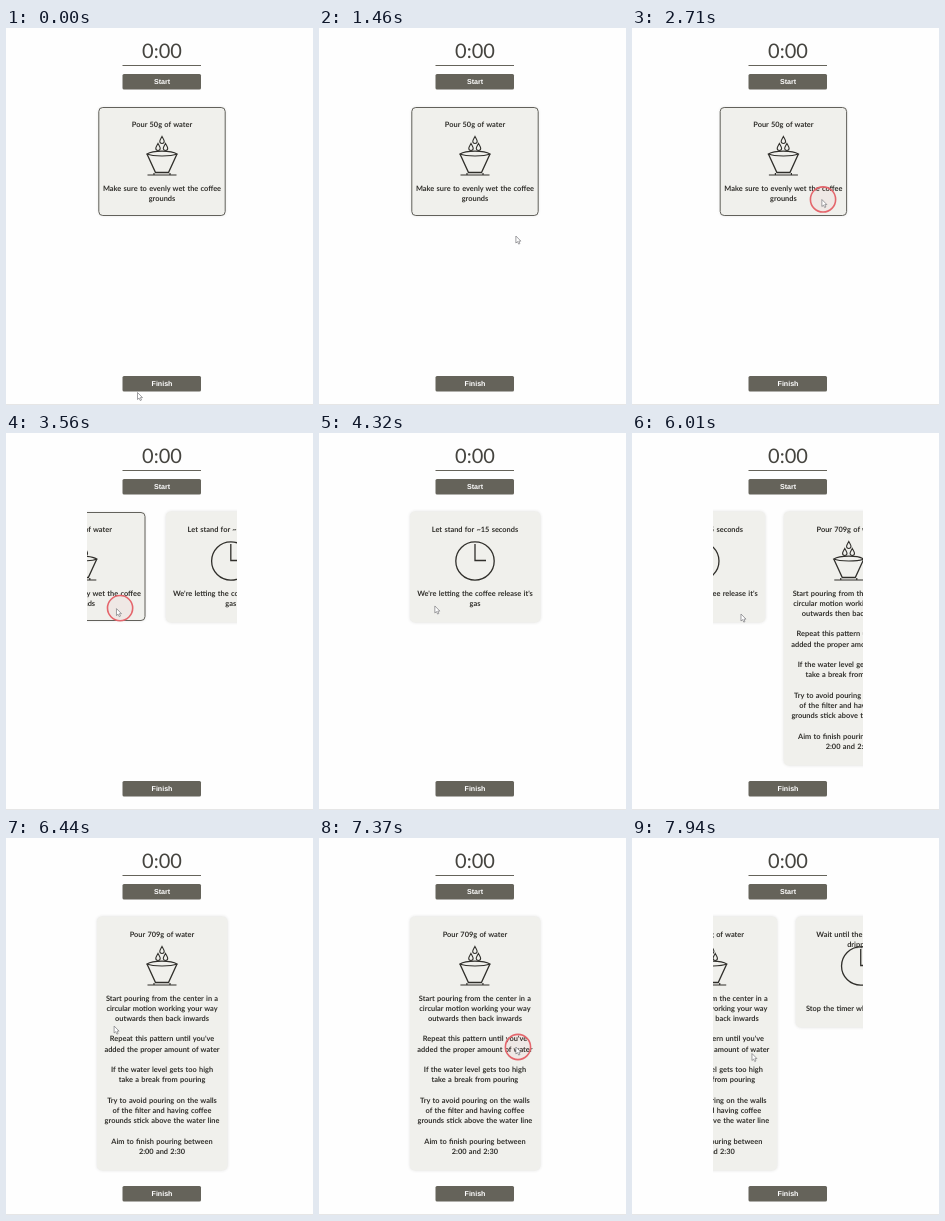
An HTML page with a canvas that plays this animation: 307 by 377 pixels, repeating every 8000 ms.

```html
<!DOCTYPE html>
<html lang="en">
<head>
<meta charset="utf-8">
<title>Brew timer</title>
<style>
html, body { margin: 0; width: 100%; height: 100%; overflow: hidden; background: #fefefe; }
canvas { display: block; width: 307px; height: 377px; }
</style>
</head>
<body>
<canvas id="stage"></canvas>
<script>
const W = 307, H = 377, LOOP = 8000;
const VIEW = { x: 81, w: 150 }, CENTER = 156, STEP = 149, ROW = 10.22;
const INK = '#302f2b', OLIVE = '#65635a', PAPER = '#f0f0ec';

const canvas = document.getElementById('stage');
const ctx = canvas.getContext('2d');
const ratio = window.devicePixelRatio || 1;
canvas.width = Math.round(W * ratio);
canvas.height = Math.round(H * ratio);
ctx.scale(ratio, ratio);

// [time, x, y]
const pointerKeys = [
  [0, 131.5, 364.5], [300, 131.5, 364.5], [1320, 197, 212], [1420, 197, 211],
  [1970, 195.5, 171], [2290, 194.5, 171], [2710, 190, 171.5], [3250, 130, 173],
  [3560, 110.5, 175.5], [3840, 106, 199], [4250, 106, 199], [4640, 160, 56],
  [4990, 195, 170], [5260, 195, 170], [5310, 187.5, 169], [5870, 114, 178],
  [6010, 109, 181], [6290, 108, 188], [6440, 108, 188], [7200, 199, 209],
  [7320, 198.5, 209], [7370, 197, 209], [7510, 185, 210], [7800, 132, 214],
  [7940, 120, 215.5], [8000, 118, 216]
];

// [time, scroll]
const scrollKeys = [
  [0, 0], [2290, 0], [2710, 4.5], [3250, 58], [3560, 80], [3640, 95], [3840, STEP],
  [5310, STEP], [5450, STEP + 12], [5870, STEP + 77], [6010, STEP + 88],
  [6290, STEP * 2], [7370, STEP * 2], [7510, STEP * 2 + 11], [7800, STEP * 2 + 63],
  [7940, STEP * 2 + 76], [8000, STEP * 2 + 92]
];

const presses = [[2290, 3690], [5290, 5950], [7340, 7920]];

const cards = [
  { icon: dripper, title: ['Pour 50g of water'], h: 108, border: true,
    body: ['Make sure to evenly wet the coffee', 'grounds'] },
  { icon: clock, title: ['Let stand for ~15 seconds'], h: 111,
    body: ["We're letting the coffee release it's", 'gas'] },
  { icon: dripper, title: ['Pour 709g of water'], h: 254,
    body: ['Start pouring from the center in a', 'circular motion working your way',
      'outwards then back inwards', '',
      "Repeat this pattern until you've", 'added the proper amount of water', '',
      'If the water level gets too high', 'take a break from pouring', '',
      'Try to avoid pouring on the walls', 'of the filter and having coffee',
      'grounds stick above the water line', '',
      'Aim to finish pouring between', '2:00 and 2:30'] },
  { icon: clock, title: ['Wait until the coffee stops', 'dripping'], h: 111,
    body: ["Stop the timer when you're done"] }
];

function sample(keys, t) {
  let i = 1;
  while (i < keys.length - 1 && keys[i][0] < t) i++;
  const a = keys[i - 1], b = keys[i];
  const k = Math.min(1, Math.max(0, (t - a[0]) / (b[0] - a[0])));
  return a.slice(1).map((v, n) => v + (b[n + 1] - v) * k);
}

function text(str, x, y, font, color, gap = 0) {
  ctx.font = font;
  ctx.wordSpacing = gap + 'px';
  ctx.textRendering = 'geometricPrecision';
  ctx.textAlign = 'center';
  ctx.fillStyle = color;
  ctx.fillText(str, x, y);
}

function box(x, y, w, h, r, color) {
  ctx.beginPath();
  ctx.roundRect(x, y, w, h, r);
  ctx.fillStyle = color;
  ctx.fill();
}

function stroke(d, width = 1.2, color = INK) {
  ctx.strokeStyle = color;
  ctx.lineWidth = width;
  ctx.stroke(new Path2D(d));
}

function clock() {
  ctx.beginPath();
  ctx.arc(0, 128, 19.2, 0, Math.PI * 2);
  ctx.strokeStyle = INK;
  ctx.lineWidth = 1.3;
  ctx.stroke();
  stroke('M0 111V127.5H11', 1.3);
}

function drop(x, y) {
  stroke(`M${x} ${y}C${x + 1} ${y + 2} ${x + 2.2} ${y + 3.2} ${x + 2.2} ${y + 4.8}
    A2.2 2.2 0 0 1 ${x - 2.2} ${y + 4.8}C${x - 2.2} ${y + 3.2} ${x - 1} ${y + 2} ${x} ${y}Z`, 1.1);
}

function dripper() {
  drop(0, 108.5);
  drop(-4, 115.5);
  drop(3.5, 115.5);
  stroke('M-15 126C-9 122.2 9 122.2 15 126C9 128.6 -9 128.6 -15 126Z', 1.1);
  stroke('M-15 126L-6.5 144.5H6.5L15 126', 1.3);
  stroke('M-8 145V147M8 145V147M-14.5 147H14.5', 1.2);
}

function drawCard(card, x) {
  ctx.save();
  ctx.translate(x, 0);
  ctx.shadowColor = 'rgba(70,70,60,.16)';
  ctx.shadowBlur = 3 * ratio;
  if (card.border) box(-63.2, 79.5, 126.4, card.h, 4, PAPER);
  else box(-65, 78.5, 130.5, card.h, 5, PAPER);
  ctx.shadowColor = 'transparent';
  if (card.border) {
    ctx.strokeStyle = '#62615b';
    ctx.lineWidth = 1;
    ctx.stroke();
  }
  const rows = (lines, y) => lines.forEach((s, i) =>
    text(s, 0, y + i * ROW, '700 7.4px Lato, sans-serif', INK, 0.5));
  rows(card.title, 98.6);
  card.icon();
  rows(card.body, (card.title.length > 1 ? 170.2 : 160) + 2.6);
  ctx.restore();
}

function button(label, y) {
  box(116.5, y, 78.5, 15.5, 1.5, OLIVE);
  text(label, CENTER, y + 10.2, '700 7.1px "Liberation Sans", Arial, sans-serif', '#fff');
}

function drawPointer(x, y) {
  const arrow = new Path2D('M0 0V7L1.6 5.6L2.8 8.1L4 7.5L2.9 5.1H5Z');
  ctx.save();
  ctx.translate(x, y);
  ctx.fillStyle = '#fff';
  ctx.fill(arrow);
  ctx.strokeStyle = '#77777c';
  ctx.lineWidth = 0.7;
  ctx.stroke(arrow);
  ctx.restore();
}

function drawPress(t) {
  if (!presses.some(([from, to]) => t >= from && t < to)) return;
  const [x, y] = sample(pointerKeys, t - 50);
  ctx.beginPath();
  ctx.arc(x + 0.5, y, 12.6, 0, Math.PI * 2);
  ctx.fillStyle = 'rgba(235,90,100,.05)';
  ctx.fill();
  ctx.strokeStyle = '#e4666c';
  ctx.lineWidth = 1.6;
  ctx.stroke();
}

function draw(t) {
  ctx.fillStyle = '#fefefe';
  ctx.fillRect(0, 0, W, H);
  text('0:00', CENTER, 30.4, '400 20px Lato, sans-serif', '#45443f');
  box(116.5, 37, 78.5, 1, 0, OLIVE);
  button('Start', 46);
  button('Finish', 348);
  box(0, 376, W, 1, 0, '#e6e6e6');

  const [scroll] = sample(scrollKeys, t);
  ctx.save();
  ctx.beginPath();
  ctx.rect(VIEW.x, 70, VIEW.w, 270);
  ctx.clip();
  cards.forEach((card, i) => {
    const x = CENTER + i * STEP - scroll;
    if (Math.abs(x - CENTER) < STEP) drawCard(card, x);
  });
  ctx.restore();

  drawPress(t);
  drawPointer(...sample(pointerKeys, t));
}

const start = performance.now();
function tick() {
  draw((performance.now() - start) % LOOP);
  requestAnimationFrame(tick);
}
tick();
</script>
</body>
</html>
```
